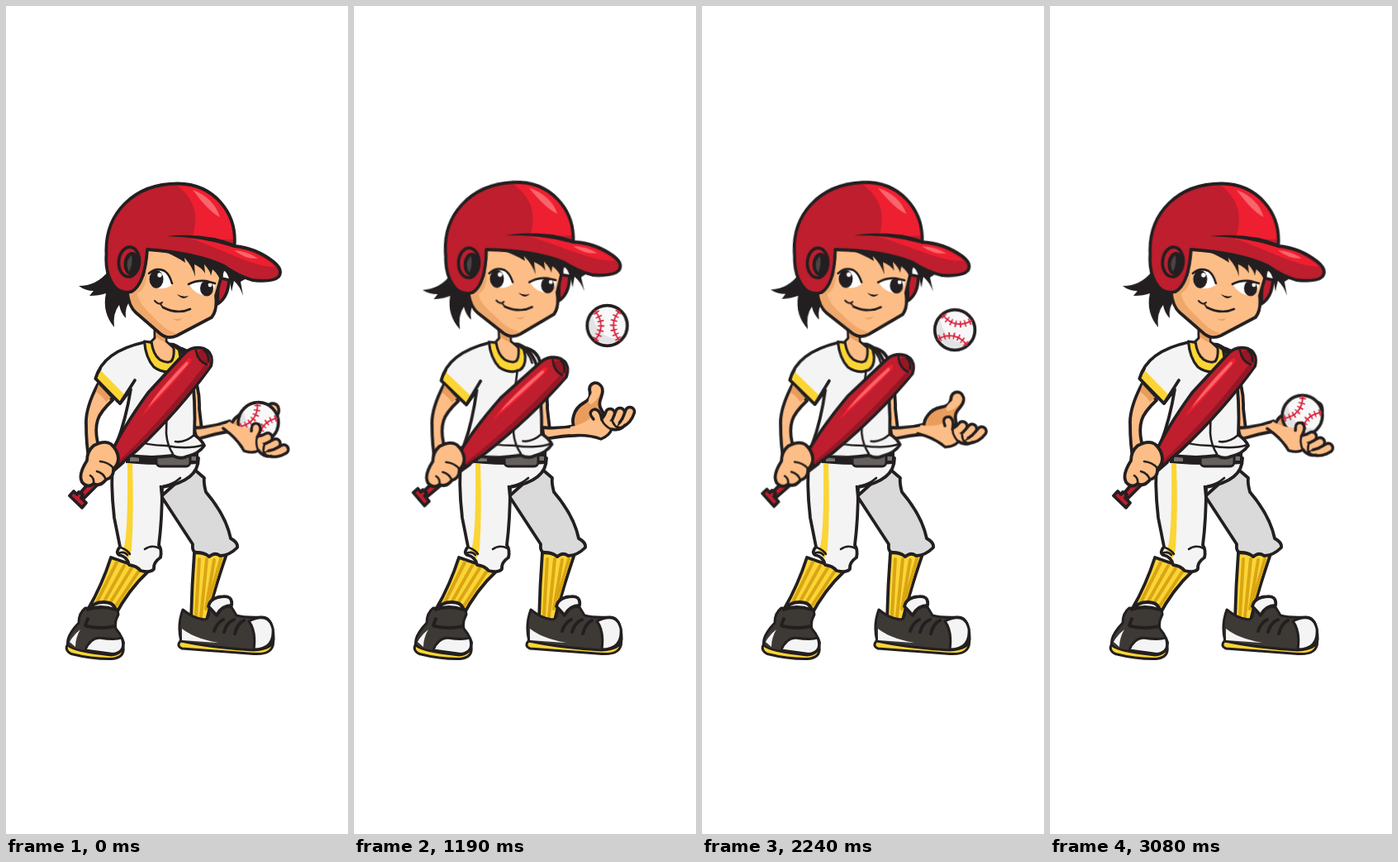
An HTML page without scripts that plays this animation: 414 by 1000 pixels, repeating every 3.15 s.

```html
<!DOCTYPE html>
<html lang="en">
<head>
<meta charset="utf-8">
<title>Ball toss</title>
<style>
html, body { margin: 0; width: 100%; height: 100%; overflow: hidden; background: #fff; }
svg { display: block; width: 100%; height: 100%; }
path, ellipse, circle, rect { stroke-linecap: round; stroke-linejoin: round; }
.o { stroke: #231f20; stroke-width: 3.8; }
.l { fill: none; stroke: #231f20; stroke-width: 2.6; }
.ink { fill: #231f20; }
.n { fill: none; }
.skin { fill: #fdbd86; }
.tan { fill: #e99d5c; }
.white { fill: #f4f4f4; }
.gray { fill: #dadada; }
.gold { fill: #fcd535; }
.shoe { fill: #3d3935; }
.red { fill: #be1e2d; }
.hot { fill: #ee1f30; }
.deep { fill: #941725; }
.pink { fill: #f9656c; }
.rib { fill: none; stroke: #d9a515; stroke-width: 4; }
.seam { fill: none; stroke: #d81f3a; stroke-width: 1.8; }
path.stitch { fill: none; stroke: #d81f3a; stroke-width: 8; stroke-linecap: butt; stroke-dasharray: 1.6 4.2; stroke-dashoffset: -2; }
.fo { fill: none; stroke: #231f20; stroke-width: 14.5; }
.fi { fill: none; stroke: #fdbd86; stroke-width: 7.4; }

.torso, .arm, .bat, .head, .hair, .hand, .ball, .spin, .fore { animation: 3150ms linear infinite; }
.torso { animation-name: torso; transform-origin: 187px 545px; }
.arm { animation-name: arm; }
.bat { animation-name: bat; transform-origin: 115px 553px; }
.head { animation-name: head; transform-origin: 185px 400px; }
.hair { animation-name: hair; }
.hand { animation-name: hand; transform-origin: 268px 515px; }
.fore { animation-name: fore; transform-origin: 232px 514px; }
.ball { animation-name: ball; }
.spin { animation-name: spin; }
.torso, .arm, .bat, .hair { animation-timing-function: cubic-bezier(.37, 0, .63, 1); }

@keyframes torso { 50% { transform: rotate(-2deg); } }
@keyframes arm { 50% { transform: translate(-3px, 1px); } }
@keyframes bat { 50% { transform: translate(-2px, 0) rotate(6.3deg); } }
@keyframes hair { 50% { transform: translate(4px, 1px); } }
@keyframes head {
  0%, 100% { transform: translate(0, 0) rotate(0deg); }
  9% { transform: translate(-.3px, 0) rotate(-.15deg); }
  22.2% { transform: translate(-2px, -.2px) rotate(-.9deg); }
  37.8% { transform: translate(-5.6px, -.7px) rotate(-2.8deg); }
  48.9%, 52% { transform: translate(-7.7px, -1px) rotate(-4.2deg); }
  64.4% { transform: translate(-6.2px, -.8px) rotate(-3.4deg); }
  80% { transform: translate(-2.9px, -.4px) rotate(-1.7deg); }
  97.8% { transform: translate(-.1px, 0) rotate(-.08deg); }
}
@keyframes hand {
  0%, 100% { transform: translate(2px, -4px) rotate(41deg); animation-timing-function: ease-in-out; }
  22.2% { transform: rotate(-6deg); }
  37.8% { transform: rotate(0deg); }
  48.9% { transform: rotate(5deg); }
  64.4% { transform: rotate(14deg); }
  80% { transform: translate(0, -1px) rotate(28deg); }
  97.8% { transform: translate(2px, -4px) rotate(39.5deg); }
}
@keyframes fore {
  0%, 97.8%, 100% { transform: rotate(-7deg); animation-timing-function: ease-in-out; }
  22.2%, 50% { transform: rotate(0deg); }
  80% { transform: rotate(-3deg); }
}
@keyframes ball {
  0%, 100% { transform: translate(305.5px, 503px); animation-timing-function: cubic-bezier(.5, 0, .75, .55); }
  22.2% { transform: translate(305.5px, 456px); }
  37.8% { transform: translate(306.5px, 386px); }
  48.9% { transform: translate(307px, 346px); animation-timing-function: ease-out; }
  53% { transform: translate(307px, 342px); animation-timing-function: cubic-bezier(.4, 0, .8, .7); }
  64.4% { transform: translate(306.5px, 368.5px); }
  80% { transform: translate(305.5px, 421px); }
  97.8% { transform: translate(305.5px, 494.5px); }
}
@keyframes spin {
  0% { transform: rotate(37deg); }
  22.2% { transform: rotate(15deg); }
  37.8% { transform: rotate(0deg); }
  48.9% { transform: rotate(-33deg); }
  64.4% { transform: rotate(-70deg); }
  80% { transform: rotate(-90deg); }
  97.8% { transform: rotate(-139deg); }
  100% { transform: rotate(-143deg); }
}
</style>
</head>
<body>
<svg viewBox="0 0 414 1000">
  <defs>
    <g id="finger">
      <path class="fo" d="M0,0 Q9,-4 12,-14"/>
      <path class="fi" d="M0,0 Q9,-4 12,-14"/>
    </g>
    <g id="arc">
      <path class="seam" d="M-15,-18 Q0,0 -15,18"/>
      <path class="stitch" d="M-15,-18 Q0,0 -15,18"/>
    </g>
    <path id="helmet" d="M171,294 C169,325 161,340 152,345 Q136,349 128,334 Q120,320 121.500,300 C119,250 155,214.500 208,214.500 C252,215 280,250 276.500,290 Q302,292 324,309 Q336,319 330,327 Q323,334 298,331 Q281,326 264,314 Q229,298 171,294 Z"/>
    <clipPath id="dome"><path d="M121,300 C118,250 155,214 208,214 C252,214 280,250 277,291 Q240,282 196,279 L130,300 Z"/></clipPath>
  </defs>

  <!-- far leg -->
  <path class="gold o" d="M228,660 Q225,700 224,741 L243,742 Q249,715 267,662 Z"/>
  <path class="rib" d="M234,668 L230,736 M243,668 L236,738 M252,669 L242,728 M260,668 L247,714"/>
  <path class="gray o" d="M188,592 L226,650 Q225,660 231,660 Q240,660 246,665 Q253,659 259,664 Q270,664 280,654 Q281,648 272,643 Q266,615 242,587 Q239,576 240,570 L226,558 Z"/>
  <path class="gold o" style="stroke-width:3" d="M211,767 Q206,773 213,776 L300,782.500 Q325,784 323.500,766 Z"/>
  <path class="shoe o" style="stroke-width:3" d="M214,729 Q207,748 212,767 Q250,775 300,778 Q323,777 324,765 Q324,737 309,738 Q290,739 279,736 L273,726 L246,724 Q247,741 240,741 Q227,740 214,729 Z"/>
  <path class="white" d="M213,752 Q228,764 257,769 L213,766 Z"/>
  <path class="white o" style="stroke-width:3" d="M300,777 Q303,755 294,743 Q318,731 323,752 Q325,777 300,777 Z"/>
  <path class="white o" d="M245,725 Q247,715 260,713.500 Q275,711 273,724 Q261,724 255,736 Z"/>
  <path class="l" style="stroke-width:4" d="M252,755 Q255,745 263,741 M264,756 Q267,745 276,741 M277,758 Q280,746 288,742"/>

  <!-- near leg -->
  <path class="gold o" d="M127,666 Q116,700 99,729 L131,738 Q148,705 173,682 Z"/>
  <path class="rib" d="M134,672 L109,722 M143,676 L116,724 M152,679 L124,724 M161,682 L130,729"/>
  <path class="gold o" style="stroke-width:3" d="M75,770 Q70,778 79,782.500 Q105,789 128,788.500 Q144,787 142,774 Z"/>
  <path class="shoe o" style="stroke-width:3" d="M96,727 Q88,733 88,745 Q72,762 75,772 Q80,779 127,784 Q142,783 142.500,769 Q140,760 133,752 Q131,744 136,735 Q136,728 129,725 Q110,728 96,727 Z"/>
  <path class="white" d="M77,768 Q82,759 90,753 Q84,763 84,774 Z"/>
  <path class="white o" style="stroke-width:2.8" d="M96,778 Q101,764 113,763 Q132,766 140,763 Q146,780 129,782.500 Z"/>
  <path class="white o" d="M99,729 Q106,720 118,720 Q131,720 132,729 Q114,723 99,729 Z"/>
  <path class="l" style="stroke-width:4" d="M97,749 Q116,753 132,749 M99,740 L96,748"/>

  <path class="white o" d="M130,543 Q126,575 131,618 L138,653 Q132,660 137,663 Q147,665 149,675 Q158,676 163,682 Q175,685 179,680 Q178,672 187,666 Q189,657 185,651 Q189,620 189,581 Q233,574 233,546 Z"/>
  <path class="gold" d="M147,553 H153 Q155,610 152,657 L148,668 L141,658 Q148,648 147,553 Z"/>
  <path class="l" d="M190,580 Q202,578 211,570 M139,654 Q147,657 150,662 M186,655 Q176,650 168,656 M136,661 Q143,658 147,663 M187,580 L189,600"/>
  <path class="ink" d="M144,538 H233 V553 Q190,556 145,552 Z"/>
  <path d="M150,544 h11 v6 h-11 Z M224,544 h6 v5 h-6 Z" fill="#77736f"/>
  <rect class="o" x="182" y="540" width="41" height="16" rx="5" fill="#65615e" style="stroke-width:3"/>

  <!-- far arm -->
  <path class="skin o" d="M224,440 Q235,460 234,486 L237,512 Q228,525 224,514 Z"/>
  <g class="fore">
    <path class="skin o" d="M228,509 Q250,511 272,506 L274,518 Q252,519 230,523 Z"/>
  </g>

  <!-- torso -->
  <g class="torso">
    <path class="white o" d="M203,412 Q226,414 229,433 Q232,446 231,458 L218,460 Z"/>
    <path class="white o" d="M168,406 Q117,417 108.500,450 L138,480 L151,463 Q145,500 134,528 Q140,540 146,542 Q173,547 202,543 Q211,548 219,544 Q233,541 240,531 Q237,524 228,518 Q230,478 224,434 Q218,415 203,409 Z"/>
    <path class="gold" d="M109,450 L114.500,440 L145,471 L138,480 Z"/>
    <path class="o n" d="M114,438 Q110,444 108.500,450 L138,480 L156,452"/>
    <path class="gold o" style="stroke-width:3.2" d="M167.500,405 Q169,425 179,436 Q191,445 204,440 Q211,436 211,424 L209,412 Z"/>
    <path class="skin o" style="stroke-width:3" d="M180,380 V401 L176,405 Q178,421 186,427 Q195,432 200,429 Q204,424 203,413 L194,405 V390 Z"/>
    <path class="tan" d="M181.500,393 L192.500,399 V406 Q185,403 181.500,399 Z"/>
    <path class="l" d="M201,440 Q194,480 194,516 Q195,530 202,541 M153,522 Q168,531 194,531 Q220,536 239,530 M228,518 Q216,528 205,526 M158,513 Q147,522 136,526 M206,413 Q216,419 219,432"/>
  </g>

  <!-- near arm, bat, fist -->
  <g class="arm">
    <path class="skin o" d="M111,457 Q96,486 97,505 Q97,530 101,551 L115,540 Q106,516 111,500 Q114,490 129,476 Z"/>
    <path class="tan" d="M112,457 L127,473 L121,478 Q116,470 109,466 Z"/>
  </g>
  <g class="bat">
    <path class="red o" d="M131,531 L103,573 L89,589 L94,595 L110,579 L142,551 Z"/>
    <path class="red o" d="M82,586 L77,591.500 L92,606 L97,600 L91,594 L93,590 L88,587 L86,590 Z"/>
    <path class="red o" d="M216,419.500 Q225,410 239,413.500 Q252,419 248,435 Q210,488 158,537 L137,554 L126,543 Q140,511 172,467 Z"/>
    <path class="deep" d="M246,436 Q207,488 157,535 L138,552 L136,550 Q190,499 241,433 Z"/>
    <path class="hot" d="M219,427 Q226,423 224,430 Q200,460 164,496 Q176,472 219,427 Z"/>
    <path class="pink" d="M218,430 Q222,429 220,433 Q196,460 172,485 Q182,467 218,430 Z"/>
    <ellipse class="deep" cx="240" cy="424" rx="6.500" ry="9.500" transform="rotate(-42 240 424)"/>
    <path class="l" d="M230,416 Q232,429 243,433 M240,416 Q246,421 245,429"/>
  </g>
  <g class="arm">
    <path class="skin o" d="M98,549 Q98,538 106,531 Q119,524 127,529 Q135,536 136,546 Q136,554 130,559 Q131,569 121,572 Q114,581 106,577 Q99,583 92,575 Q87,566 98,549 Z"/>
    <path class="l" d="M130,558 Q124,551 114,550 M121,572 Q118,564 110,562 M106,577 Q107,570 102,567"/>
  </g>

  <!-- head -->
  <g class="head">
    <path class="ink hair" d="M124,320 Q110,338 88,338 Q96,344 106,344 L101,350 Q113,350 121,347 Q116,370 131,388 Q129,371 137,361 Q139,371 145,377 Q143,363 153,352 L150,325 Z"/>
    <path class="red o" d="M257,328 L270,331 Q269,352 256,360 Z"/>
    <path class="skin o" d="M170,292 L166,325 L147,346 Q149,363 157,370 L187,396 Q196,403 207,398 L249,376 Q256,367 254,350 L261,326 L250,300 Z"/>
    <path class="tan" d="M168,328 Q160,341 149,347 Q150,360 157,367 L188,394 Q197,400 207,396 Q190,390 177,374 Q160,359 159,347 Q172,340 170,318 Z" opacity=".65"/>
    <path fill="#fff" d="M174,322 Q187,316 194,322 Q199,327 201,337 Q189,345 175,338 Z"/>
    <path fill="#fff" d="M222,337 Q229,331 242,333 L253,337 Q252,348 243,350 Q229,349 222,337 Z"/>
    <ellipse class="ink" cx="182" cy="330" rx="8.500" ry="11"/>
    <ellipse class="ink" cx="243" cy="341" rx="8" ry="9.500"/>
    <circle cx="186" cy="325" r="2.700" fill="#fff"/>
    <circle cx="247" cy="337" r="2.400" fill="#fff"/>
    <path class="l" d="M173,323 Q182,315 192,320 Q198,324 201,335 M221,336 Q230,331 242,332 L253,335"/>
    <path class="ink" d="M207,348 Q214,352 221,350 Q215,357 207,348 Z"/>
    <path class="l" d="M190,364 Q208,373 223,366"/>
    <path class="l" style="stroke-width:2" d="M180,356 Q185,362 189,358 M187,360 L190,364"/>
    <path class="tan" d="M202,377 Q208,380 214,376 Q208,384 202,377 Z"/>
    <path class="ink" d="M183,293 Q204,301 217,310 L216,304 Q226,315 229,327 L228,312 Q237,316 241,323 L240,312 Q248,321 248,326 L250,318 Q258,325 260,334 L264,320 Q270,322 273,345 L276,332 Q283,338 287,350 L284,333 L291,329 L270,303 Z"/>
    <use href="#helmet" class="red"/>
    <g clip-path="url(#dome)">
      <path class="hot" d="M204,214 Q226,230 229,252 Q230,268 224,282 H282 V210 Z"/>
    </g>
    <path class="pink" d="M226,222 Q252,232 259,255 Q246,249 226,222 Z"/>
    <path class="hot" d="M225,281 Q254,283 277,291 Q307,298 326,315 Q309,315 284,305 Q258,294 225,281 Z"/>
    <path class="pink" d="M276,295 Q292,296 305,305 Q290,306 276,295 Z"/>
    <path class="ink" d="M194,278 Q242,273 278,288 L277,292 Q238,279 194,278 Z"/>
    <use href="#helmet" class="o n"/>
    <ellipse class="red o" cx="149" cy="309" rx="12.500" ry="18" transform="rotate(5 149 309)"/>
    <ellipse class="ink" cx="152" cy="311" rx="9.500" ry="14" transform="rotate(5 152 311)"/>
    <path fill="#4a4543" d="M152,301 Q143,309 149,321 Q154,311 152,301 Z"/>
  </g>

  <!-- hand and ball -->
  <g class="hand">
    <path class="tan o" d="M268,514 C261,500 267,486 277,480 C288,474 286,469 285,463 C285,456 292,453 297,457 C303,462 301,468 298,476 C296,483 299,487 302,492 L290,512 Z"/>
    <path class="skin" d="M288,467 Q286,458 293,457 Q301,459 298,468 Q294,477 287,481 Q280,480 288,467 Z"/>
  </g>
  <g class="ball">
    <circle class="o" r="24.300" fill="#f8f8f8"/>
    <path fill="#e3e3e5" d="M-18,-13 A22.200,22.200 0 0 0 15,16 Q-12,16 -18,-13 Z"/>
    <g class="spin">
      <use href="#arc"/>
      <use href="#arc" transform="rotate(180)"/>
    </g>
  </g>
  <g class="hand">
    <use href="#finger" x="322" y="504"/>
    <use href="#finger" x="310" y="505"/>
    <use href="#finger" x="298" y="506"/>
    <path class="skin" d="M262,508 Q277,506 288,496 Q286,488 294,488 L300,500 L320,503 Q319,510 311,511 Q309,519 299,523 Q283,517 262,519 Z"/>
    <path class="l" style="stroke-width:3.400" d="M290,499 Q282,490 291,487 Q298,487 300,500 M262,519 Q283,517 299,523 Q309,519 312,511 Q322,514 328,506"/>
    <path class="l" d="M300,500 Q303,507 311,511 M313,502 Q315,507 320,510"/>
  </g>
</svg>
</body>
</html>
```
